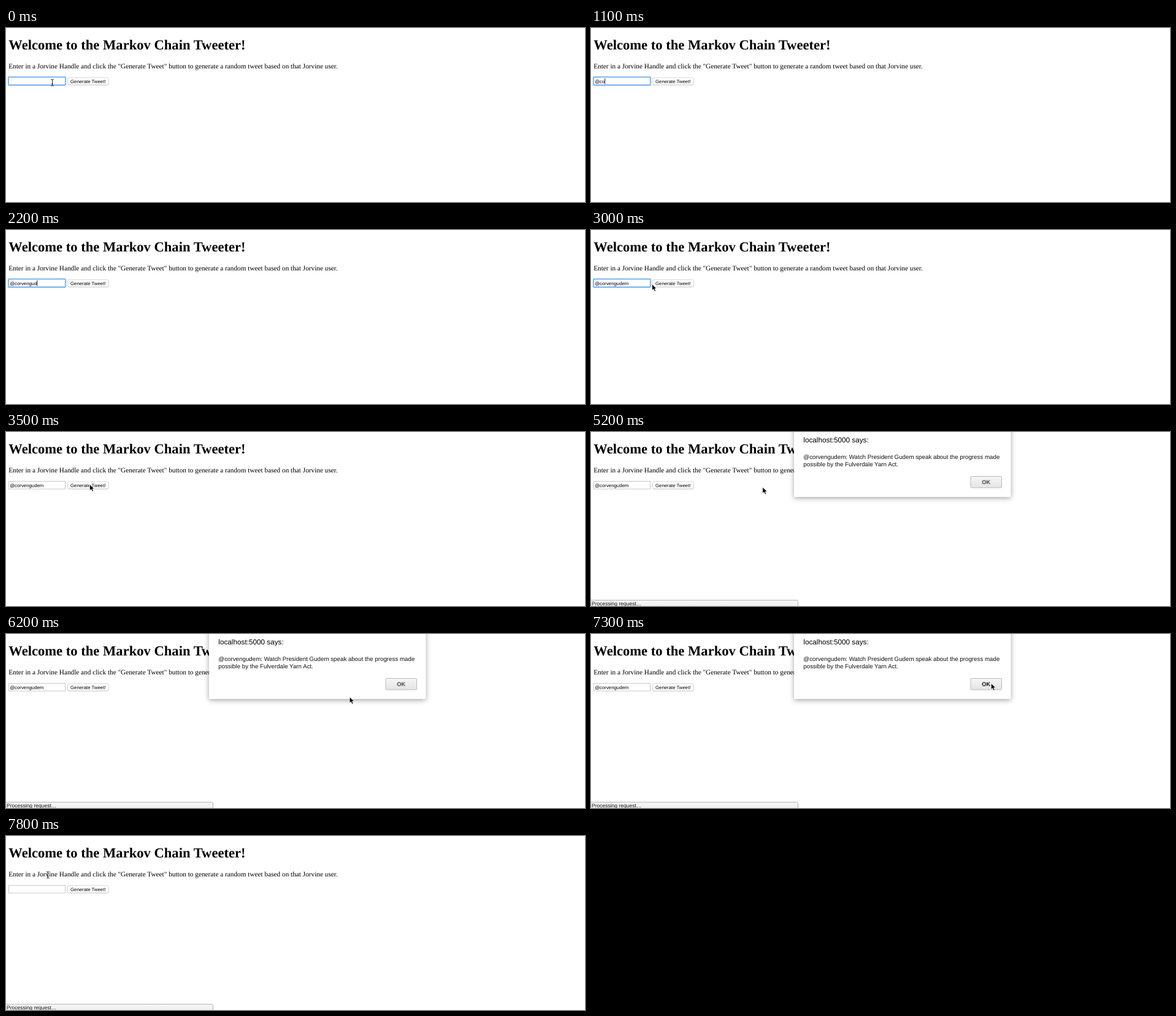
Write an HTML page that moves like this. It is 944 by 284 pixels and loops after 8 s.

```html
<!DOCTYPE html>
<html lang="en">
<head>
<meta charset="utf-8">
<title>Markov Chain Tweeter</title>
<style>
  html, body { margin: 0; width: 100%; height: 100%; overflow: hidden; background: #fff; }
  svg { display: block; width: 944px; height: 284px; }
  text { text-rendering: geometricPrecision; white-space: pre; }
  .serif { font-family: "Liberation Serif", Times, serif; }
  .sans { font-family: "Liberation Sans", Arial, sans-serif; }
  .small { font-size: 7.8px; }
  #dialog { filter: drop-shadow(0 2px 4px rgba(0, 0, 0, .36)); }
</style>
</head>
<body>
<svg viewBox="0 0 944 284">
  <defs>
    <linearGradient id="face" x2="0" y2="1">
      <stop stop-color="#f6f6f6"/><stop offset="1" stop-color="#e4e4e4"/>
    </linearGradient>
    <linearGradient id="bar" x2="0" y2="1">
      <stop stop-color="#f6f6f6"/><stop offset="1" stop-color="#efefef"/>
    </linearGradient>
  </defs>

  <g class="serif">
    <text x="4.3" y="34.5" font-size="22.6" font-weight="bold">Welcome to the Markov Chain Tweeter!</text>
    <text x="4.2" y="65.6" font-size="11.27">Enter in a Jorvine Handle and click the "Generate Tweet" button to generate a random tweet based on that Jorvine user.</text>
  </g>

  <g class="sans small">
    <rect x="4.5" y="80.5" width="92" height="12.5" fill="#fff" stroke="#c9c9c9"/>
    <g id="focus" fill="none">
      <rect x="3.6" y="79.6" width="93.8" height="14.2" rx="1.5" stroke="#b5d4f6" stroke-width="2"/>
      <rect x="4.4" y="80.4" width="92.2" height="12.6" rx=".5" stroke="#74aeee" stroke-width="1.3"/>
    </g>
    <text id="handle" x="6.2" y="89.7"></text>
    <path id="caret" d="M0 82V91.5" stroke="#000" stroke-width=".8"/>
    <rect x="100" y="81.6" width="67.8" height="12.2" rx="3" fill="#ddd"/>
    <rect x="100.5" y="81" width="66.8" height="11.7" rx="2.8" fill="#fff" stroke="#cdcdcd" stroke-width=".8"/>
    <text x="105" y="89.8">Generate Tweet!</text>
  </g>

  <g id="status" class="sans">
    <path d="M-1 274.5H335.5Q337.5 274.5 337.5 276.5V285H-1Z" fill="url(#bar)" stroke="#b4b4b4"/>
    <text id="note" x="1" y="283.4" font-size="8.5" fill="#111"></text>
  </g>

  <g id="dialog" class="sans">
    <path id="sheet" d="M331 -9H684.5V104.5Q684.5 106 683 106H332.5Q331 106 331 104.5Z" fill="#fff"/>
    <g id="content">
      <text x="346.3" y="16.8" font-size="11.75">localhost:5000 says:</text>
      <g font-size="9.75" fill="#111">
        <text x="346.3" y="44.2">@corvengudem: Watch President Gudem speak about the progress made</text>
        <text x="346.3" y="56">possible by the Fulverdale Yarn Act.</text>
      </g>
      <rect x="619" y="72.5" width="50.5" height="18.5" rx="1.5" fill="url(#face)" stroke="#b9b9b9"/>
      <text id="ok" x="644.3" y="85.2" font-size="9.3" font-weight="bold" text-anchor="middle">OK</text>
    </g>
  </g>

  <path id="arrow" d="M0 0V10.2L2.4 8L4.1 11.8L6 11L4.4 7.3H7.6Z" fill="#000" stroke="#fff" stroke-width=".8"/>
  <path id="beam" d="M-2.2 -5.5Q0 -5.5 0 -4Q0 -5.5 2.2 -5.5M0 -4.5V4.5M-2.2 5.5Q0 5.5 0 4Q0 5.5 2.2 5.5M-1.3 2H1.3" fill="none" stroke="#222"/>
</svg>
<script>
const $ = id => document.getElementById(id);
const HANDLE = "@corvengudem";
const LOOP = 8000, STEP = 100;

const HOME = { x: 75.5, y: 89 };
const MOVES = [
  { from: 2700, to: 3400, x: 136.5, y: 85.5 },
  { from: 4950, to: 5500, x: 468, y: 110 },
  { from: 5700, to: 6700, x: 652.3, y: 80.5 },
  { from: 7400, to: 7800, x: 68.3, y: 63.5 }
];

// smooth rise from 0 to 1 between two times
function ease(t, from, to) {
  const k = Math.min(1, Math.max(0, (t - from) / (to - from)));
  return k * k * (3 - 2 * k);
}

// the pointer sets off sideways and bends up or down later
function pointerAt(t) {
  return MOVES.reduce((p, m) => {
    const k = ease(t, m.from, m.to);
    return { x: p.x + (m.x - p.x) * k, y: p.y + (m.y - p.y) * k * k };
  }, HOME);
}

// "@" comes first, the rest follows at an even pace
function typedCount(t) {
  if (t < 500 || t >= 7500) return 0;
  return Math.max(1, Math.floor(2 + (t - 900) / 160));
}

const show = (id, on) => $(id).setAttribute("visibility", on ? "visible" : "hidden");
const move = (id, x, y) => $(id).setAttribute("transform", `translate(${x} ${y})`);

function draw(t) {
  const focused = t < 3300;
  $("handle").textContent = HANDLE.slice(0, typedCount(t));
  show("focus", focused);
  show("caret", focused && t >= 500 && t < 2900);
  move("caret", 6.6 + $("handle").getComputedTextLength(), 0);

  $("status").setAttribute("opacity", ease(t, 3700, 3900));
  $("note").textContent = t < 4900 ? "Waiting for localhost…" : "Processing request…";

  const opened = ease(t, 4300, 4700), gap = 1 - opened;
  const fade = opened - ease(t, 7300, 7500);
  $("dialog").setAttribute("opacity", fade);
  show("dialog", fade > 0);
  move("sheet", 0, -12 * gap);
  $("content").setAttribute("transform",
    `translate(${506 * .04 * gap} ${-14 * gap}) scale(${1 - .04 * gap})`);

  const { x, y } = pointerAt(t);
  const visible = t < 500 || t >= 2700, overText = x < 98;
  $("ok").setAttribute("fill", x > 619 ? "#111" : "#444");
  show("beam", visible && overText);
  show("arrow", visible && !overText);
  move("beam", x, y);
  move("arrow", x, y);
}

function frame() {
  const t = performance.now() % LOOP;
  draw(Math.floor(t / STEP) * STEP);
  requestAnimationFrame(frame);
}
frame();
</script>
</body>
</html>
```
